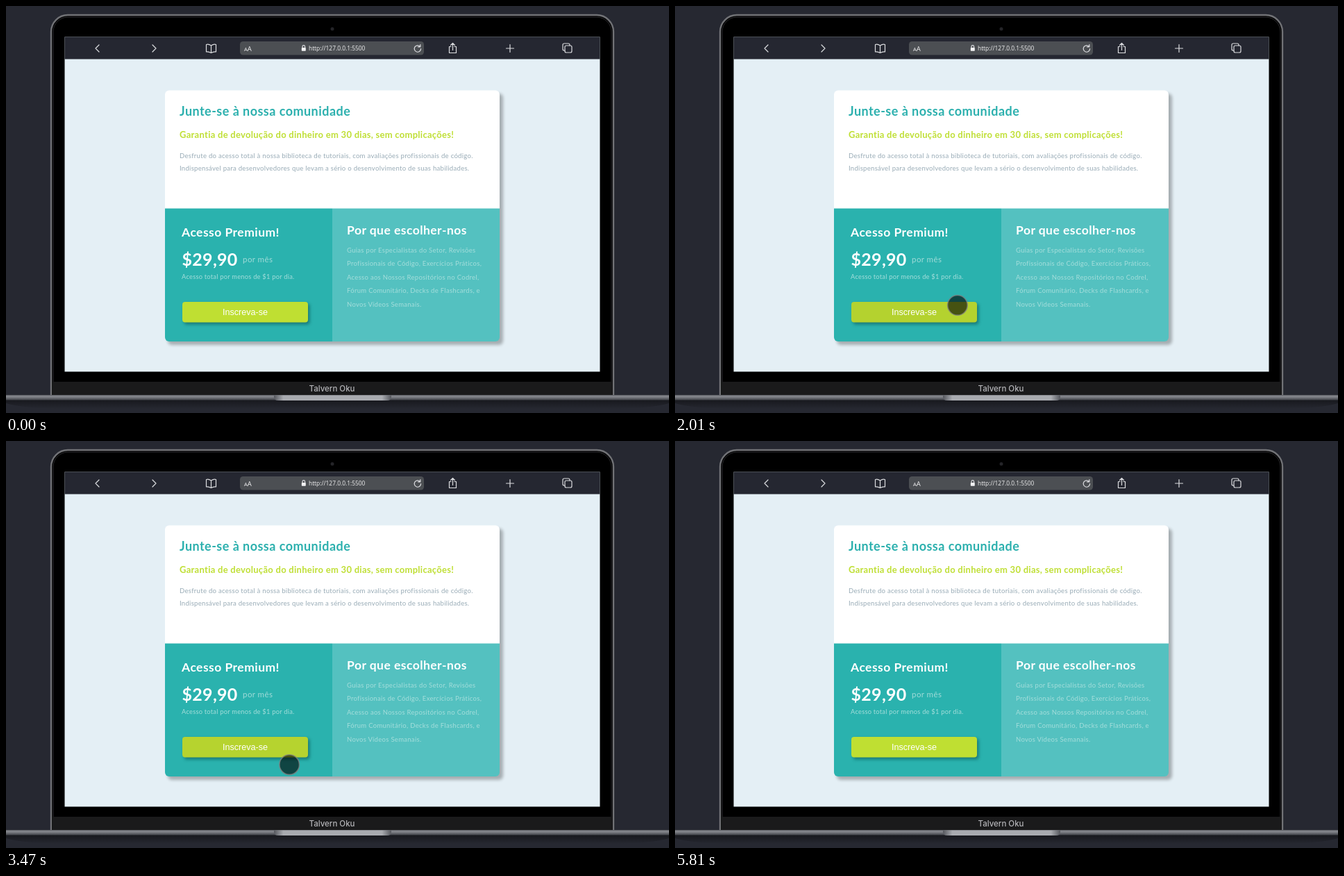
Write an HTML page that moves like this. It is 955 px wide and 586 px high and loops after 6630 ms.

```html
<!DOCTYPE html>
<html lang="pt">
<head>
<meta charset="utf-8">
<style>
html, body { margin: 0; width: 100%; height: 100%; overflow: hidden; background: #262831; }
svg { display: block; width: 955px; height: 586px; }
text { font-family: Lato, sans-serif; white-space: pre; }
.title { font-size: 17.5px; font-weight: 700; letter-spacing: .46px; fill: #fff; }
.join { font-size: 18px; fill: #2cb0ae; }
.offer { font-size: 13px; font-weight: 700; letter-spacing: .28px; fill: #bfdf34; }
.body { font-size: 9.6px; letter-spacing: .26px; fill: #98abb6; }
.pale { font-size: 9.5px; letter-spacing: .3px; fill: #a5dedb; }
.total { font-size: 9.3px; letter-spacing: .24px; }
.price { font-size: 25px; font-weight: 700; letter-spacing: .3px; fill: #fff; }
.month { font-size: 11.5px; letter-spacing: .43px; fill: #a0dbd8; }
.button { font: 12.6px "Liberation Sans", Arial, sans-serif; fill: #fff; }
.url { font: 500 8.4px "Open Sans", sans-serif; fill: #f2f2f3; }
.model { font: 500 11.5px Inter, sans-serif; fill: #b4b4b8; }
.icons { fill: none; stroke: #dcdde0; stroke-width: 1.2; stroke-linecap: round; stroke-linejoin: round; }
</style>
</head>
<body>
<svg viewBox="0 0 955 586">
  <defs>
    <linearGradient id="base" x2="0" y2="1">
      <stop offset="0" stop-color="#5c5e64"/><stop offset=".3" stop-color="#898b91"/>
      <stop offset="1" stop-color="#3e4046"/>
    </linearGradient>
    <linearGradient id="notch">
      <stop offset="0" stop-color="#55575d"/><stop offset=".08" stop-color="#a9abb0"/>
      <stop offset=".92" stop-color="#a9abb0"/><stop offset="1" stop-color="#55575d"/>
    </linearGradient>
    <linearGradient id="under" x2="0" y2="1">
      <stop offset="0" stop-color="#17181d"/><stop offset="1" stop-color="#262831"/>
    </linearGradient>
    <filter id="soft" x="-10%" y="-40%" width="120%" height="180%"><feGaussianBlur stdDeviation="2.2"/></filter>
    <clipPath id="card"><rect x="229" y="121.5" width="482" height="361.5" rx="6"/></clipPath>
  </defs>

  <rect width="955" height="586" fill="#262831"/>

  <!-- Laptop -->
  <path d="M65 562V37A24 24 0 0 1 89 13H851A24 24 0 0 1 875 37V562Z" fill="#000" stroke="#717276" stroke-width="2.4"/>
  <path d="M68 560V37A21 21 0 0 1 89 16H851A21 21 0 0 1 872 37V560" fill="none" stroke="#2b2b2e"/>
  <rect x="67" y="541" width="806" height="20" fill="#1a1a1b"/>
  <circle cx="470" cy="33" r="2.5" fill="#242428"/>
  <text class="model" x="469.5" y="555" text-anchor="middle">Talvern Oku</text>
  <path d="M0 567H955V572Q930 579 880 580H75Q25 579 0 572Z" fill="url(#under)"/>
  <rect y="560" width="955" height="7.5" fill="url(#base)"/>
  <path d="M386 560.5H555V563Q555 568 549 568H392Q386 568 386 563Z" fill="url(#notch)"/>

  <!-- Browser -->
  <rect x="84.5" y="44.5" width="771" height="482" fill="#e4eff5"/>
  <rect x="84.5" y="44.5" width="771" height="32" fill="#252731"/>
  <rect x="337" y="51" width="265" height="19.5" rx="4.5" fill="#4c4f53"/>
  <g class="icons">
    <path d="M134 56L129 61L134 66M211 56L216 61L211 66"/>
    <path d="M295.5 57Q292 54.5 288.5 55.5V66Q292 65.5 295.5 67.5Q299 65.5 302.5 66V55.5Q299 54.5 295.5 57V67"/>
    <path d="M641 58.5H638.5V67.5H648.5V58.5H646M643.5 63.5V54M640.5 56.5L643.5 53.5L646.5 56.5"/>
    <path d="M720.5 61H731.5M726 55.5V66.5"/>
    <rect x="805" y="57" width="10" height="10" rx="2"/>
    <path d="M805 64H804Q802 64 802 62V56Q802 54 804 54H810Q812 54 812 56V57"/>
    <path d="M596.5 58.5A4.7 4.7 0 1 0 597.6 61.5M596.8 55.5V58.8H593.5"/>
    <path d="M427 60.5V58.5A1.8 1.8 0 0 1 430.6 58.5V60.5"/>
  </g>
  <rect x="425.8" y="60" width="6" height="4.7" rx=".8" fill="#f2f2f3"/>
  <text class="url" x="343" y="64.5" style="font-size:7.5px">A<tspan font-size="9.5">A</tspan></text>
  <text class="url" x="436" y="64">http://127.0.0.1:5500</text>

  <!-- Card -->
  <rect x="233" y="126" width="483" height="362" rx="6" fill="#000" opacity=".27" filter="url(#soft)"/>
  <g clip-path="url(#card)">
    <rect x="228" y="121" width="484" height="171" fill="#fff"/>
    <rect x="228" y="291.5" width="242" height="192" fill="#2ab2ae"/>
    <rect x="470" y="291.5" width="242" height="192" fill="#54c1c0"/>
  </g>
  <text class="title join" x="250" y="158">Junte-se à nossa comunidade</text>
  <text class="offer" x="250" y="189.5">Garantia de devolução do dinheiro em 30 dias, sem complicações!</text>
  <text class="body" x="250" y="219">Desfrute do acesso total à nossa biblioteca de tutoriais, com avaliações profissionais de código.</text>
  <text class="body" x="250" y="237">Indispensável para desenvolvedores que levam a sério o desenvolvimento de suas habilidades.</text>

  <text class="title" x="253" y="332">Acesso Premium!</text>
  <text class="price" x="253.5" y="373.5">$29,90</text>
  <text class="month" x="341" y="369">por mês</text>
  <text class="pale total" x="253" y="393">Acesso total por menos de $1 por dia.</text>

  <text class="title" x="491" y="329">Por que escolher-nos</text>
  <text class="pale" y="335">
    <tspan x="491" dy="19.5">Guias por Especialistas do Setor, Revisões</tspan>
    <tspan x="491" dy="19.5">Profissionais de Código, Exercícios Práticos,</tspan>
    <tspan x="491" dy="19.5">Acesso aos Nossos Repositórios no Codrel,</tspan>
    <tspan x="491" dy="19.5">Fórum Comunitário, Decks de Flashcards, e</tspan>
    <tspan x="491" dy="19.5">Novos Vídeos Semanais.</tspan>
  </text>

  <rect x="256.5" y="428.5" width="181" height="30" rx="4" fill="#0b4c4b" opacity=".55" filter="url(#soft)"/>
  <rect id="button" x="254" y="426" width="181" height="29.5" rx="4"/>
  <text class="button" x="344.5" y="445" text-anchor="middle">Inscreva-se</text>

  <circle id="cursor" r="14.3" fill="#000" fill-opacity=".61" stroke="#808080" stroke-opacity=".75" stroke-width="1.6"/>
</svg>
<script>
const LOOP = 6630, ENTER = 140, LEAVE = 5800, FADE = 400, STEP = 10;
const button = document.getElementById('button');
const cursor = document.getElementById('cursor');

// Places where the cursor turns; bow is how far the way to the next one curves
const turns = [
  { t: 480, x: 385, y: 430, bow: [0, 28] },
  { t: 1520, x: 379, y: 439, bow: [-70, -25] },
  { t: 2400, x: 544, y: 467, bow: [-90, -36] },
  { t: 3470, x: 408, y: 466, bow: [45, 8] },
  { t: 4130, x: 393, y: 454, bow: [45, 10] },
  { t: 5090, x: 406, y: 470, bow: [-50, -45] },
  { t: 5560, x: 494, y: 489 }
];
const first = turns[0], last = turns[turns.length - 1];

const mix = (a, b, u) => a + (b - a) * u;
const easeOut = (u, power) => 1 - (1 - u) ** power;
const smooth = u => u * u * (3 - 2 * u);

function position(t) {
  if (t < first.t) {
    const u = Math.max(0, (t - ENTER) / (first.t - ENTER));
    return [mix(930, first.x, easeOut(u, 2)), mix(512, first.y, easeOut(u, 10))];
  }
  if (t >= last.t) {
    const u = ((t - last.t) / (LEAVE - last.t)) ** 1.5;
    return [mix(last.x, 745, u), mix(last.y, 570, u)];
  }
  const i = turns.findIndex(turn => turn.t > t);
  const a = turns[i - 1], b = turns[i], u = (t - a.t) / (b.t - a.t);
  const bend = Math.sin(Math.PI * u);
  return [mix(a.x, b.x, smooth(u)) + a.bow[0] * bend, mix(a.y, b.y, smooth(u)) + a.bow[1] * bend];
}

const visible = t => t >= ENTER && t < LEAVE;

function hovering(t) {
  const [x, y] = position(t);
  return visible(t) && x > 254 && x < 435 && y > 426 && y < 455.5;
}

// Hover amount over the loop, rising and falling linearly
const hover = [];
for (let t = 0, level = 0; t < LOOP; t += STEP) {
  level = Math.min(1, Math.max(0, level + (hovering(t) ? STEP : -STEP) / FADE));
  hover.push(level);
}

const normal = [191, 223, 50], active = [178, 207, 46];

function draw(now) {
  const t = now % LOOP, level = hover[Math.floor(t / STEP)];
  const [x, y] = position(t);
  cursor.setAttribute('visibility', visible(t) ? 'visible' : 'hidden');
  cursor.setAttribute('transform', `translate(${x} ${y})`);
  button.setAttribute('fill', `rgb(${normal.map((c, i) => mix(c, active[i], level))})`);
  requestAnimationFrame(draw);
}
draw(performance.now());
</script>
</body>
</html>
```
